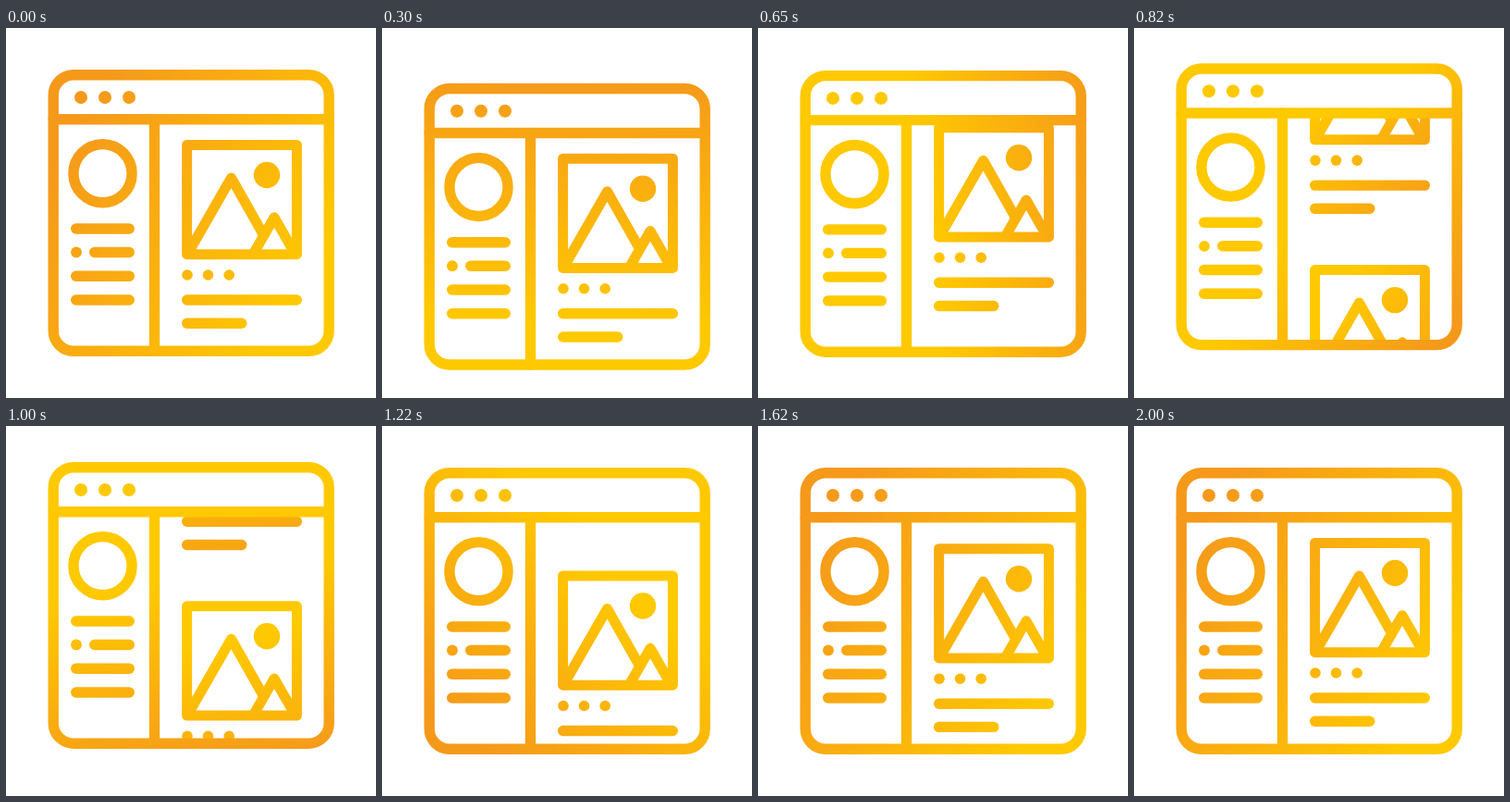
An HTML page with a canvas that plays this animation: 400 by 400 pixels, repeating every 2020 ms.

```html
<!DOCTYPE html>
<html lang="en">
<head>
<meta charset="utf-8">
<title>Page scroll icon</title>
<style>
html, body { margin: 0; width: 100%; height: 100%; overflow: hidden; background: #fff; }
canvas { display: block; width: 400px; height: 400px; }
</style>
</head>
<body>
<canvas id="stage" width="400" height="400"></canvas>
<script>
const canvas = document.getElementById('stage');
const ctx = canvas.getContext('2d');
const LOOP = 2020;
const STROKE = 11.4;
const POST_GAP = 259;

const clamp = v => Math.min(1, Math.max(0, v));
const span = (t, from, to) => clamp((t - from) / (to - from));
const cubic = x => x < 0.5 ? 4 * x ** 3 : 1 - 4 * (1 - x) ** 3;

// Vertical bounce of the whole window
function windowY(t) {
  return 14.8 * cubic(span(t, 0, 334))
    - 21.8 * cubic(span(t, 334, 909))
    + 7 * cubic(span(t, 909, 1190));
}

// cubic-bezier(.31, 0, 0, 1), solved by bisection
function scrollEase(x) {
  let lo = 0, hi = 1;
  for (let i = 0; i < 30; i++) {
    const u = (lo + hi) / 2;
    if (0.93 * (1 - u) ** 2 * u + u ** 3 < x) lo = u; else hi = u;
  }
  const u = (lo + hi) / 2;
  return u * u * (3 - 2 * u);
}

// The orange end circles the window once
function paint(t) {
  const p = span(t, 0, 1600);
  const deg = -150 + 360 * p - 7 * Math.sin(2 * Math.PI * p);
  const a = deg * Math.PI / 180;
  const bump = Math.sin(Math.PI * p) ** 2;
  const near = 155 + 35 * bump;
  const far = 150 - 140 * bump;
  const dx = Math.cos(a), dy = Math.sin(a);
  const g = ctx.createLinearGradient(
    200 + dx * near, 200 + dy * near, 200 - dx * far, 200 - dy * far);
  g.addColorStop(0, '#f5991b');
  g.addColorStop(1, '#ffc900');
  return g;
}

function dot(x, y, r) {
  ctx.beginPath();
  ctx.arc(x, y, r, 0, 2 * Math.PI);
  ctx.fill();
}

function path(...pts) {
  ctx.beginPath();
  for (let i = 0; i < pts.length; i += 2) ctx.lineTo(pts[i], pts[i + 1]);
  ctx.stroke();
}

// Round-ended bar given by its outer ends
function bar(x1, x2, y) {
  path(x1 + STROKE / 2, y, x2 - STROKE / 2, y);
}

function drawFrame() {
  ctx.beginPath();
  ctx.roundRect(51.2, 50.7, 298, 298.6, 22);
  ctx.stroke();
  path(51.2, 98.7, 349.2, 98.7);
  path(160.5, 98.7, 160.5, 349.3);
  for (const x of [81, 107, 133]) dot(x, 75, 7);
}

function drawSidebar() {
  ctx.beginPath();
  ctx.arc(104.5, 157.2, 31.6, 0, 2 * Math.PI);
  ctx.stroke();
  bar(70, 139, 217);
  dot(76, 242.5, 5.9);
  bar(90, 139, 242.5);
  bar(70, 139, 268.2);
  bar(70, 139, 294);
}

function drawPost(y) {
  ctx.save();
  ctx.translate(0, y);
  ctx.lineWidth = 11;
  ctx.strokeRect(195.6, 126.5, 118.8, 118.2);
  path(197, 243, 243.5, 162, 278, 223);
  path(267.5, 244, 290, 204.7, 312.5, 244);
  ctx.lineWidth = STROKE;
  dot(282, 159, 14.2);
  for (const x of [196, 218.5, 241.2]) dot(x, 267, 5.8);
  bar(190, 320, 294);
  bar(190, 260.5, 319.2);
  ctx.restore();
}

function draw(t) {
  ctx.fillStyle = '#fff';
  ctx.fillRect(0, 0, 400, 400);

  const wy = windowY(t);
  const scroll = POST_GAP * scrollEase(span(t, 480, 1990));
  const grad = paint(t);

  ctx.save();
  ctx.translate(0, wy);
  // Keep the gradient fixed to the stage while the shapes bounce
  ctx.fillStyle = ctx.strokeStyle = grad;
  ctx.lineWidth = STROKE;
  ctx.lineCap = ctx.lineJoin = 'round';

  ctx.save();
  ctx.beginPath();
  ctx.rect(160.5, 98.7, 188.7, 250.6);
  ctx.clip();
  drawPost(-scroll);
  drawPost(POST_GAP - scroll);
  ctx.restore();

  drawFrame();
  drawSidebar();
  ctx.restore();
}

function tick() {
  draw(performance.now() % LOOP);
  requestAnimationFrame(tick);
}
tick();
</script>
</body>
</html>
```
